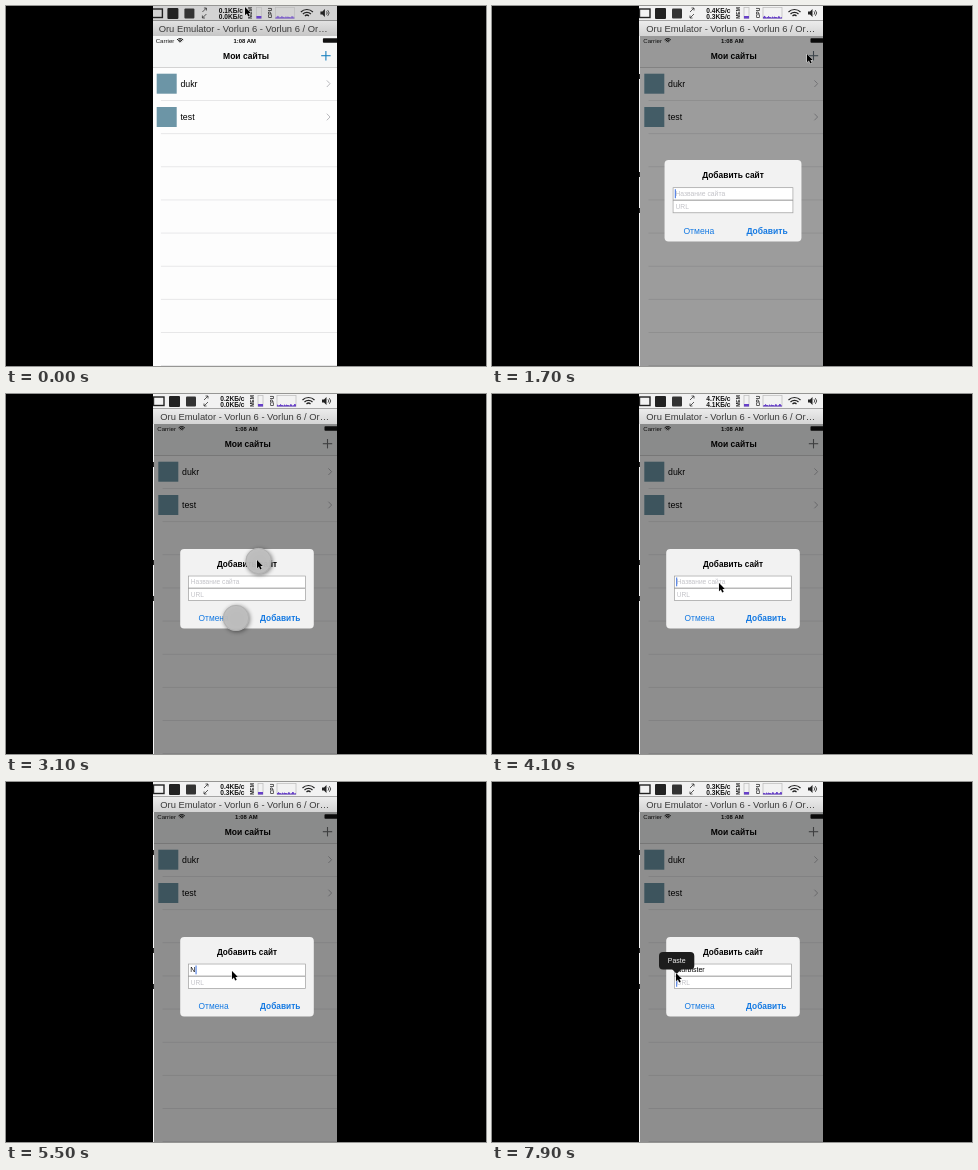
An HTML page with a canvas that plays this animation: 480x360 px, repeating every 8 s.

```html
<!DOCTYPE html>
<html lang="ru">
<head>
<meta charset="utf-8">
<style>
html, body { margin: 0; width: 100%; height: 100%; overflow: hidden; background: #000; }
canvas { display: block; width: 480px; height: 360px; }
</style>
</head>
<body>
<canvas id="stage"></canvas>
<script>
const LOOP = 8000, W = 480, H = 360;
const SANS = '"Liberation Sans", Arial, sans-serif';
const cv = document.getElementById('stage');
const dpr = window.devicePixelRatio || 1;
cv.width = W * dpr;
cv.height = H * dpr;
const c = cv.getContext('2d');

const clamp = v => Math.max(0, Math.min(1, v));
const span = (t, a, b) => clamp((t - a) / (b - a));
const smooth = p => p * p * (3 - 2 * p);
const easeOut = p => 1 - (1 - p) ** 3;
const mix = (a, b, p) => a + (b - a) * p;
const grey = v => `rgb(${v},${v},${v})`;

function rect(x, y, w, h, fill) {
  c.fillStyle = fill;
  c.fillRect(x, y, w, h);
}

function round(x, y, w, h, r, fill) {
  c.beginPath();
  c.roundRect(x, y, w, h, r);
  c.fillStyle = fill;
  c.fill();
}

function frame(x, y, w, h, color, lw = 1) {
  c.strokeStyle = color;
  c.lineWidth = lw;
  c.strokeRect(x, y, w, h);
}

function line(points, color, lw = 1) {
  c.beginPath();
  points.forEach(([x, y], i) => i ? c.lineTo(x, y) : c.moveTo(x, y));
  c.strokeStyle = color;
  c.lineWidth = lw;
  c.stroke();
}

function text(s, x, y, size, color, align = 'left', weight = 400) {
  c.font = `${weight} ${size}px ${SANS}`;
  c.textAlign = align;
  c.textBaseline = 'alphabetic';
  c.fillStyle = color;
  c.fillText(s, x, y);
}

function wifi(x, y, r, color, lw) {
  c.strokeStyle = color;
  c.lineWidth = lw;
  for (let i = 1; i <= 3; i++) {
    c.beginPath();
    c.arc(x, y, r * i / 3, -Math.PI * 0.75, -Math.PI * 0.25);
    c.stroke();
  }
}

// Pointer tip: time, x, y
const path = [
  [0, 239, 1], [350, 239, 1], [1200, 315, 48], [1750, 315, 48],
  [2150, 251, 166], [3550, 251, 166], [3950, 227, 189],
  [5000, 227, 189], [5200, 226, 189], [6500, 226, 189],
  [6950, 184, 191], [8000, 184, 191]
];

function pointer(t) {
  let i = 0;
  while (i < path.length - 2 && t >= path[i + 1][0]) i++;
  const [a, x, y] = path[i], [b, u, v] = path[i + 1];
  const p = smooth(span(t, a, b));
  return [mix(x, u, p), mix(y, v, p)];
}

const rates = [
  ['0.1', '0.0'], ['0.4', '0.3'], ['0.2', '0.0'], ['0.2', '0.0'],
  ['4.7', '4.1'], ['0.4', '0.3'], ['0.3', '0.2'], ['0.3', '0.3']
];

function sideLabel(s, x) {
  c.save();
  c.translate(x, 7);
  c.rotate(-Math.PI / 2);
  text(s, 0, 2, 5, '#222', 'center', 700);
  c.restore();
}

function menuBar(t, lit) {
  const sec = Math.floor(t / 1000);
  rect(140, 0, 200, 15, grey(mix(211, 242, lit)));
  rect(140, 14, 200, 1, grey(mix(142, 165, lit)));
  frame(147.5, 3, 10.5, 8.5, '#222', 1.4);
  round(163, 2, 11, 11, 1, '#222');
  round(180, 2.5, 10, 10, 1, '#333');

  line([[198, 6], [202, 2]], '#333', 0.8);
  line([[199.5, 2], [202, 2], [202, 4.5]], '#333', 0.8);
  line([[202, 8], [198, 12]], '#333', 0.8);
  line([[198, 9.5], [198, 12], [200.5, 12]], '#333', 0.8);
  rates[sec].forEach((v, i) => text(v + 'KБ/с', 238.5, 7 + 6 * i, 6.6, '#111', 'right', 700));

  sideLabel('MEM', 246);
  frame(252, 1.5, 5, 11, '#bbb', 0.7);
  rect(252, 10, 5, 2.5, '#6740c8');
  sideLabel('CPU', 265.5);
  frame(271, 1.5, 19, 11, '#bbb', 0.7);
  for (let i = 0; i < 19; i++) {
    const k = i + sec;
    const h = 1 + 1.6 * Math.abs(Math.sin(k * 2.3) * Math.sin(k * 0.7));
    rect(271 + i, 12.5 - h, 1, h, '#6740c8');
  }
  wifi(302.5, 12, 8.5, '#222', 1.2);
  c.beginPath();
  [[316, 5.5], [318, 5.5], [320.5, 3], [320.5, 11], [318, 8.5], [316, 8.5]]
    .forEach(p => c.lineTo(...p));
  c.fillStyle = '#222';
  c.fill();
  for (const r of [2.2, 4]) {
    c.beginPath();
    c.arc(320.5, 7, r, -0.8, 0.8);
    c.strokeStyle = '#222';
    c.lineWidth = 0.8;
    c.stroke();
  }
}

function titleBar(lit) {
  const g = c.createLinearGradient(0, 15, 0, 30);
  g.addColorStop(0, grey(mix(226, 236, lit)));
  g.addColorStop(1, grey(mix(198, 212, lit)));
  rect(147, 15, 190, 15, g);
  text('Oru Emulator - Vorlun 6 - Vorlun 6 / Or…', 238.7, 26, 9.4, '#3a3a3a', 'center');
}

function row(name, y) {
  rect(152.3, y - 10, 20, 20, '#6c95a6');
  text(name, 176, y + 3, 8.8, '#000');
  line([[322.4, y - 3.3], [325.6, y], [322.4, y + 3.3]], '#b9b9bd', 1);
}

function phone(dim) {
  rect(148, 30, 190, 330, '#fdfdfd');
  rect(148, 30, 190, 32, '#f6f7f7');
  rect(148, 61.3, 190, 0.7, '#c4c4c4');
  text('Carrier', 151.3, 36.7, 6.1, '#111');
  wifi(175.7, 37, 4.4, '#111', 1);
  text('1:08 AM', 240.3, 36.8, 5.9, '#111', 'center', 700);
  round(318.5, 32.2, 15, 4.6, 0.8, '#111');
  text('Мои сайты', 241.7, 53.3, 8.5, '#000', 'center', 700);
  const tint = `rgb(${mix(25, 110, dim)},${mix(128, 112, dim)},${mix(190, 114, dim)})`;
  line([[316.8, 49.7], [326.2, 49.7]], tint, 1.1);
  line([[321.5, 45], [321.5, 54.4]], tint, 1.1);
  row('dukr', 77.7);
  row('test', 111);
  for (let i = 1; i < 10; i++) rect(156.5, 61.2 + 33.1 * i, 180, 0.7, '#dedee0');
  rect(148, 30, 190, 330, `rgba(0,0,0,${0.44 * dim})`);
}

function field(y, hint, value, caret) {
  rect(182, y, 118, 12.5, '#fff');
  frame(182.5, y + 0.5, 117, 12, '#9c9c9c', 0.7);
  if (value) text(value, 184.3, y + 8.8, 7, '#000');
  else text(hint, 184.8, y + 8.7, 6.6, '#c3c3c8');
  if (caret) rect(184.2 + (value ? c.measureText(value).width + 0.3 : 0), y + 2, 1, 8.8, '#3a6fe0');
}

function dialog(t, p) {
  const name = 'Nurbister'.slice(0, t < 5400 ? 0 : 1 + Math.floor((t - 5400) / 120));
  const blink = t % 1100 < 850;
  const second = t >= 6950;
  c.save();
  c.globalAlpha = clamp(p * 1.15);
  c.translate(241, 195);
  const s = mix(1.2, 1, p);
  c.scale(s, s);
  c.translate(-241, -195);
  round(174.2, 155, 133.6, 79.6, 4, '#f2f2f2');
  text('Добавить сайт', 241, 173, 8.2, '#000', 'center', 700);
  field(181.5, 'Название сайта', name, blink && !second);
  field(194, 'URL', '', blink && second);
  text('Отмена', 207.6, 227, 8.4, '#1479e2', 'center');
  text('Добавить', 274.2, 227, 8.3, '#1479e2', 'center', 700);
  c.restore();
}

function touch(x, y) {
  c.save();
  c.shadowColor = 'rgba(0,0,0,.5)';
  c.shadowBlur = 4 * dpr;
  c.shadowOffsetX = c.shadowOffsetY = dpr;
  c.beginPath();
  c.arc(x, y, 13, 0, Math.PI * 2);
  c.fillStyle = 'rgba(192,192,192,.95)';
  c.fill();
  c.restore();
  c.beginPath();
  c.arc(x, y, 12.6, 0, Math.PI * 2);
  c.strokeStyle = '#aeaeae';
  c.lineWidth = 0.8;
  c.stroke();
}

function pasteMenu() {
  round(167, 170, 35.3, 17.6, 4, '#1d1d1d');
  c.beginPath();
  c.moveTo(180, 187);
  c.lineTo(184.7, 192);
  c.lineTo(189.4, 187);
  c.fill();
  text('Paste', 184.7, 181.3, 7, '#f2f2f2', 'center');
}

function arrow(x, y) {
  c.beginPath();
  [[0, 0], [0, 8.2], [1.9, 6.5], [3.2, 9.5], [4.7, 8.8], [3.4, 5.9], [5.9, 5.9]]
    .forEach(([u, v]) => c.lineTo(x + u, y + v));
  c.closePath();
  c.lineJoin = 'round';
  c.strokeStyle = '#e8e8e8';
  c.lineWidth = 1;
  c.stroke();
  c.fillStyle = '#000';
  c.fill();
}

function draw(t) {
  const open = easeOut(span(t, 1500, 1900));
  const settle = smooth(span(t, 0, 600));
  const [x, y] = pointer(t);
  c.setTransform(dpr, 0, 0, dpr, 0, 0);
  rect(0, 0, W, H, '#000');
  c.save();
  c.beginPath();
  c.rect(147, 0, 184, H);
  c.clip();
  rect(147, 30, 1, 330, '#f4f4f4');
  for (const ty of [68, 166, 202]) rect(147, ty, 1, 5, '#222');

  c.save();
  c.translate(-1.6 * (1 - settle), 0);
  menuBar(t, settle);
  titleBar(settle);
  phone(open);
  c.restore();

  if (open > 0) dialog(t, open);
  if (t >= 2000 && t < 3600) {
    touch(x + 1.6, y + 1);
    touch(481 - x, 390 - y);
  }
  if (t >= 7500) pasteMenu();
  arrow(x, y);
  c.restore();
}

const start = performance.now();
function tick() {
  draw((performance.now() - start) % LOOP);
  requestAnimationFrame(tick);
}
tick();
</script>
</body>
</html>
```
